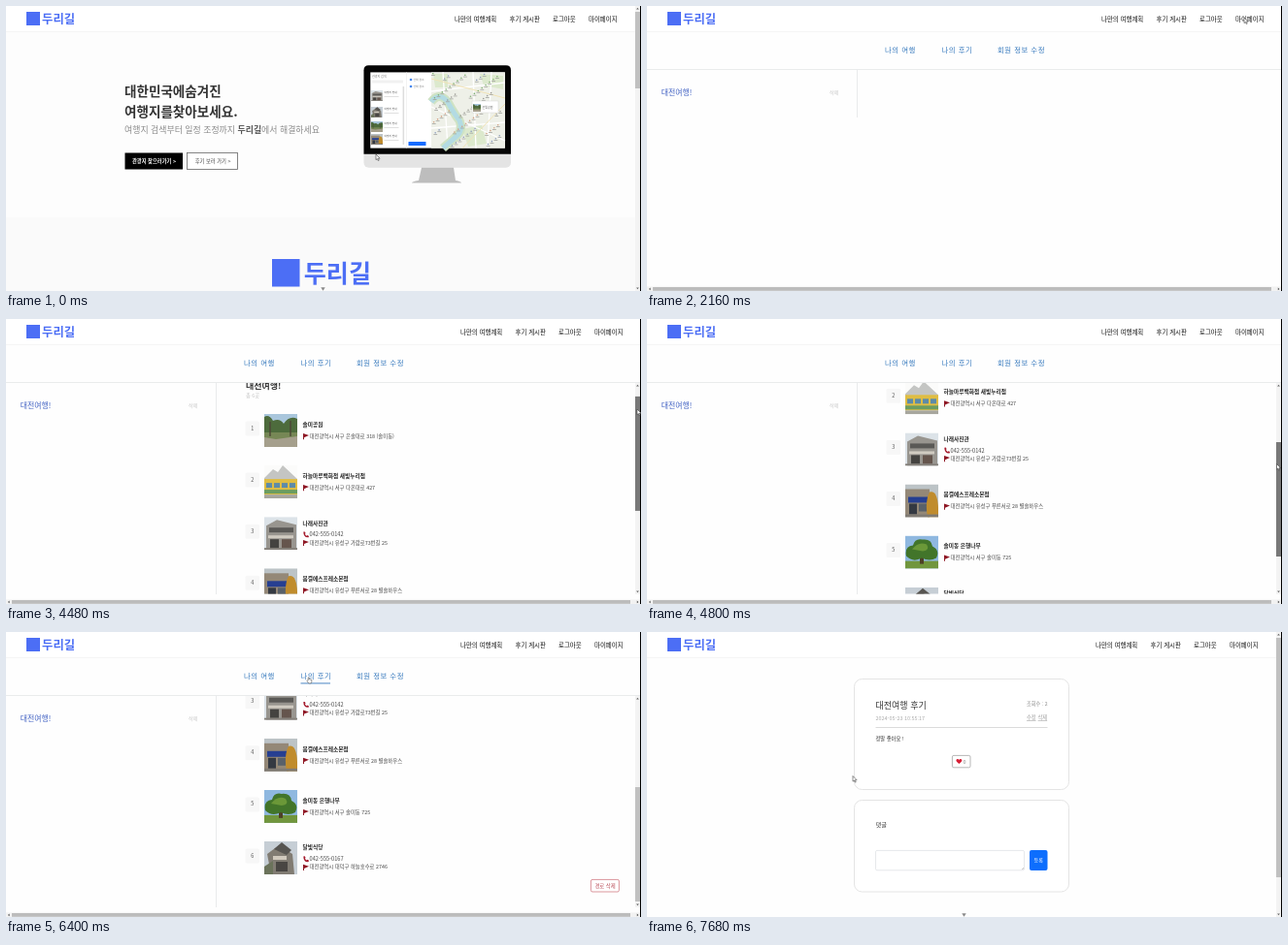
An HTML page for the animation above (8000 ms loop, 654 by 294 pixels).

```html
<!DOCTYPE html>
<html lang="ko">
<head>
<meta charset="utf-8">
<title>여행 계획</title>
<style>
html, body { margin: 0; width: 100%; height: 100%; overflow: hidden; background: #fff; }
svg { display: block; font-family: "Noto Sans CJK KR", "Noto Sans CJK", "Noto Sans", sans-serif; }
text { white-space: pre; }
</style>
</head>
<body>
<svg id="stage" width="654" height="294" viewBox="0 0 654 294"></svg>
<script>
const BLUE = '#4c6ef5', LINE = '#e4e6e8';

// y is the vertical middle of the text
const text = (x, y, s, size, fill = '#333', more = '') =>
  `<text x="${x}" y="${y + size * 0.37}" font-size="${size}" fill="${fill}" ${more}>${s}</text>`;
const rect = (x, y, w, h, fill, more = '') =>
  `<rect x="${x}" y="${y}" width="${w}" height="${h}" fill="${fill}" ${more}/>`;
const path = (d, fill, more = '') => `<path d="${d}" fill="${fill}" ${more}/>`;
const stroke = (d, color, width = 1) => path(d, 'none', `stroke="${color}" stroke-width="${width}"`);
const bold = 'font-weight="700"';

const logo = (x, y, size) =>
  rect(x, y, size, size, BLUE) +
  text(x + size * 1.15, y + size / 2, '두리길', size * 0.88, BLUE, bold);

// Flat pictures on a 34 x 34 field
const art = [
  rect(0, 0, 34, 34, '#a9c6dc') + rect(0, 20, 34, 14, '#a59f8c') +
    path('M0 3Q5 0 9 7Q16 4 20 10Q26 1 34 5V22H0Z', '#4d6b3c') +
    path('M0 19H34V23L12 26L0 24Z', '#768755') + stroke('M6 8V23M27 7V23', '#4c4536', 1.4),
  rect(0, 0, 34, 34, '#fbfbfa') + path('M0 13L9 4L14 7L19 0L34 14V20H0Z', '#c4c5c3') +
    rect(0, 14, 34, 16, '#dfbd43') + rect(0, 25, 34, 4, '#6c9d61') +
    [2, 10, 18, 26].map(x => rect(x, 18, 6, 5, '#5d8ba8')).join('') + rect(0, 30, 34, 4, '#a7a69d'),
  rect(0, 0, 34, 34, '#dce3e8') + path('M2 9L13 3L33 8V34H2Z', '#98958f') +
    rect(5, 11, 25, 5, '#5a5956') + rect(4, 19, 26, 3, '#d0cbc1') +
    rect(6, 23, 9, 9, '#444340') + rect(18, 23, 10, 9, '#65554d') + rect(0, 32, 34, 2, '#837f79'),
  rect(0, 0, 34, 34, '#bcc3c6') + rect(0, 5, 25, 29, '#948877') +
    rect(3, 13, 20, 6, '#263f91') + rect(4, 20, 8, 11, '#343942') + rect(14, 20, 8, 8, '#59616a') +
    path('M25 8Q35 5 34 34H23Q20 18 25 8Z', '#c08c2d') + rect(0, 31, 34, 3, '#807b74'),
  rect(0, 0, 34, 34, '#8fb8e0') + rect(0, 26, 34, 8, '#71963d') + rect(15, 19, 4, 10, '#4e4027') +
    path('M1 21Q-1 11 8 10Q10 2 18 4Q27 3 28 11Q36 15 32 23Q25 27 17 23Q8 28 1 21Z', '#42752a') +
    path('M7 14Q14 5 22 9Q26 15 18 16Z', '#6b9838'),
  rect(0, 0, 34, 34, '#c6ced5') + path('M3 13L15 4L29 13L31 34H7Z', '#817c73') +
    path('M10 8L18 1L28 9L23 14Z', '#575551') + rect(9, 15, 14, 4, '#d0c9bd') +
    rect(12, 21, 12, 10, '#494643') + path('M0 26L9 20V34H0Z', '#6b735b')
];
const photo = (i, x, y, w = 34, h = w) =>
  `<svg x="${x}" y="${y}" width="${w}" height="${h}" viewBox="0 0 34 34" preserveAspectRatio="none">${art[i]}</svg>`;

const nav = [[462, '나만의 여행계획'], [518.5, '후기 게시판'], [563, '로그아웃'], [600, '마이페이지']];
const header = dx => rect(0, 26, 654, 1, '#f5f5f5') + rect(0, 0, 654, 26, '#fff') +
  logo(21, 6, 14) + nav.map(([x, s]) => text(x + dx, 13.3, s, 6.45, '#111')).join('');

const vBar = (top, bottom) => rect(648, top, 5, bottom - top, '#f3f3f3') +
  path(`M649.1 ${top + 3.5}h2.8l-1.4 -1.7zM649.1 ${bottom - 3.5}h2.8l-1.4 1.7z`, '#666');
const pageBar = height => vBar(0, 294) + rect(648, 6, 5, height, '#c1c1c1');
const downMark = path('M324.3 290.3h4.4l-2.2 3.4z', '#8a8a8a');

function monitor() {
  // Small place marks and labels, spread evenly by a low-discrepancy rule
  const places = Array.from({ length: 70 }, (_, i) => {
    const x = 439 + (i * 0.618 % 1) * 70, y = 69 + (i * 0.7549 % 1) * 75;
    const color = ['#7eaf72', '#8d9cbd', '#d3a084', '#9a9a94'][i % 4];
    return rect(x, y, 1.6, 1.6, color, 'rx=".8"') + rect(x - 1, y + 2.2, 3.8, .8, '#a3a49f');
  }).join('');
  const map = rect(438, 68.4, 76, 78.2, '#eef0e8') +
    path('M440 70h15v14h-13zM488 70l24 2v14l-20 -4zM470 127l20 -4l5 19l-19 3z', '#dce9cd') +
    stroke('M438 88L514 79M438 126L514 120M450 68.4L455 146.6M481 68.4L484 146.6M500 68.4L496 146.6M438 104L514 139', '#fff', 1.3) +
    stroke('M438 99Q446 88 455 99Q462 112 467 118Q472 129 461 137L450 146.6', '#cfe3c4', 9) +
    stroke('M438 99Q446 88 455 99Q462 112 467 118Q472 129 461 137L450 146.6', '#b3dbe3', 5) +
    stroke('M438 75L514 95M470 146.6L514 101', '#f1e3b6', 1) + places +
    rect(480, 98, 27, 12, '#fff', 'stroke="#ccc" stroke-width=".4"') + photo(0, 481, 101, 8) +
    text(490.5, 104.5, '은빛공원', 3, '#555');
  const list = [87, 104, 119, 132].map((y, i) => photo([2, 5, 0, 3][i], 376, y, 12, 11) +
    text(389.5, y + 2.5, '여행지 안내', 2.7, '#555') + rect(389.5, y + 6, 15, .6, '#ccc')).join('');
  return rect(368.5, 61.3, 151.5, 105.5, '#e4e4e4', 'rx="5"') +
    path('M368.5 152.8V66.3Q368.5 61.3 373.5 61.3H515Q520 61.3 520 66.3V152.8Z', '#050505') +
    rect(375.3, 68.4, 138.4, 78.2, '#fff') + list + text(377, 73, '관광지 검색', 3, '#777') +
    rect(377, 76.5, 32, 3, '#f1f1f1') + rect(408.6, 83, 1.5, 60, '#ddd') +
    stroke('M412.5 68.4V146.6', '#eee', .7) +
    [76, 83].map(y => `<circle cx="417" cy="${y}" r="1.3" fill="#4687ed"/>` + text(419.5, y, '선택 장소', 2.8, '#777')).join('') +
    rect(414.5, 140, 18, 4, '#176cff', 'rx=".5"') + map +
    path('M428 166.8H461L463 180Q469 181 469 182.5H418Q418 181 425 180Z', '#bdbdbd');
}

const home = rect(0, 26, 648, 192, '#fdfdfd') + rect(0, 218, 648, 76, '#fafafa') +
  text(122, 88, '대한민국에숨겨진', 13.55, '#333', bold) +
  text(122, 109.2, '여행지를찾아보세요.', 13.55, '#333', bold) +
  text(122, 127.5, `여행지 검색부터 일정 조정까지 <tspan ${bold} fill="#555">두리길</tspan>에서 해결하세요`, 8.91, '#8b8b8b') +
  rect(122.5, 151.5, 59.5, 17, '#000') + text(130, 159.7, '관광지 찾으러가기 &gt;', 5.3, '#fff', bold) +
  rect(186.5, 151.5, 52, 17, '#fff', 'stroke="#666" stroke-width=".8"') +
  text(194.7, 159.7, '후기 보러 가기 &gt;', 5.3, '#444') +
  monitor() + logo(274, 261, 28.5) + downMark + header(0) + pageBar(79);

const tabs = [[245, '나의 여행'], [303.5, '나의 후기'], [361, '회원 정보 수정']]
  .map(([x, s]) => text(x, 45.5, s, 7.4, '#3578bd', 'letter-spacing=".5"')).join('');
const myPage = rect(0, 26, 654, 268, '#fefefe') + tabs + rect(0, 65, 654, .8, LINE) + header(6);

const trips = text(14.7, 89, '대전여행!', 7.9, '#4464c4') + text(188, 89.3, '삭제', 5, '#c5c5c5') +
  rect(0, 289.5, 654, 4.5, '#f2f2f2') + rect(6, 290, 637, 3.8, '#bcbcbc') +
  path('M3.6 290.6v2.6l-1.7 -1.3zM649.8 290.6v2.6l1.7 -1.3z', '#555');

const stops = [
  ['솔미공원', '대전광역시 서구 은솔대로 318 (솔미동)'],
  ['하늘마루백화점 새빛누리점', '대전광역시 서구 다온대로 427'],
  ['나래사진관', '대전광역시 유성구 가람로73번길 25', '042-555-0142'],
  ['봄결에스프레소본점', '대전광역시 유성구 푸른서로 28 별솔하우스'],
  ['솔미동 은행나무', '대전광역시 서구 솔미동 725'],
  ['달빛식당', '대전광역시 대덕구 하늘호수로 2746', '042-555-0167']
];
const flag = y => path(`M306 ${y - 2.8}l6 2l-5 2.2v2h-1z`, '#8e1724');
const phone = y => path(`M306.3 ${y - 2.6}l1.5 -.2l.8 1.7l-.7 .7q.6 1.3 1.8 1.9l.8 -.7l1.5 .9l-.4 1.4q-5.2 .6 -5.3 -5.7z`, '#a51c2e');
const stop = ([name, address, tel], i) => {
  const y = 112.5 + i * 53.1, nameY = y + (tel ? 6.3 : 10.7), addressY = y + (tel ? 26.5 : 22.8);
  return rect(246.5, y + 7.5, 14.5, 15, '#f7f7f7', 'rx="1.5"') +
    text(253.7, y + 14.5, i + 1, 5.5, '#555', 'text-anchor="middle"') + photo(i, 266, y) +
    text(305.5, nameY, name, 5.7, '#222', bold) + flag(addressY) + text(312.6, addressY, address, 5.35, '#444') +
    (tel ? phone(y + 18) + text(312.6, y + 18.2, tel, 5.6, '#444') : '');
};
const route = rect(216, 66, .8, 218, LINE) +
  '<svg x="217" y="66" width="431" height="217.5" viewBox="217 66 431 217.5"><g id="scroll">' +
  text(247, 83.5, '대전여행!', 9, '#333', bold) + text(247, 94, '총 6곳', 5.3, '#c4c4c4') +
  stops.map(stop).join('') +
  rect(602.4, 417.4, 29, 12.6, '#fff', 'rx="1.6" stroke="#ca6871" stroke-width=".7"') +
  text(606.4, 423.7, '경로 삭제', 5.4, '#b94d58') + '</g></svg>' +
  vBar(66, 284) + rect(648, 72, 5, 118, '#c1c1c1', 'id="thumb"');

const reviews = rect(143, 122, 367, .7, '#bbb') + rect(143, 137, 367, .7, LINE) + rect(143, 160, 367, .7, LINE) +
  text(152, 130, '번호', 5.4, '#777') + text(205, 130, '제목', 5.4, '#777') + text(435, 130, '작성일', 5.4, '#777') +
  text(156, 149, '1', 5.6) + text(205, 149, '대전여행 후기', 5.8) + text(435, 149, '2024-05-23', 5.4, '#888');

const card = (y, h) => rect(213.5, y, 221, h, '#fff', 'rx="8" stroke="#dedede" stroke-width=".8"');
const detail = rect(0, 26, 648, 268, '#fefefe') + card(48.5, 114) + card(173.5, 94.5) +
  text(235.5, 75.7, '대전여행 후기', 9, '#333') + text(391, 74, '조회수 : 2', 5.2, '#888') +
  text(235.5, 88.5, '2024-05-23 10:55:17', 5.45, '#aaa') +
  text(391, 88.5, '수정', 5.2, '#999', 'text-decoration="underline"') +
  text(402.6, 88.5, '삭제', 5.2, '#999', 'text-decoration="underline"') +
  rect(235.5, 98, 177, .8, '#d2d2d2') + text(235.5, 110, '정말 좋아요 !', 5.3, '#333') +
  rect(314.4, 127.4, 18.6, 12.4, '#fff', 'rx="1.5" stroke="#999" stroke-width=".7"') +
  path('M321.4 136q-5 -3.6 -1.8 -5q1.2 -.3 1.8 .9q.6 -1.2 1.8 -.9q3.2 1.4 -1.8 5z', '#d81e35') +
  text(325.4, 133.6, '0', 5.4, '#888') + text(235.5, 199, '댓글', 6.2, '#333') +
  rect(235.5, 225.4, 153, 20.4, '#fff', 'rx="1.5" stroke="#dcdfe2" stroke-width=".7"') +
  stroke('M386 245l2 -2M387.2 245l.8 -.8', '#888', .4) +
  rect(394, 225, 18.5, 21, '#0d6efd', 'rx="2"') + text(398.6, 235.5, '등록', 5.1, '#fff') +
  downMark + header(0) + pageBar(247);

const group = (id, body) => `<g id="${id}">${body}</g>`;
stage.innerHTML = rect(0, 0, 654, 294, '#fff') +
  group('homeView', home) + group('myView', myPage) + group('tripView', trips) +
  group('shortEdge', rect(216, 66, .8, 49, LINE)) + group('routeView', route) +
  group('tabLine', rect(303.5, 52.5, 30.5, .9, '#3578bd')) +
  group('reviewView', reviews) + group('rowLine', rect(205, 152.2, 34, .5, '#333')) +
  group('detailView', detail) + rect(653, 0, 1, 294, '#000') +
  group('arrow', path('M0 0V5.7L1.3 4.5L2.3 6.6L3.2 6.2L2.3 4.2H4.1Z', '#fff', 'stroke="#333" stroke-width=".55"')) +
  group('hand', path('M1.2 3.4V.6Q1.7 -.2 2.2 .6V2.2L4.8 2.8V5L4.2 6.4H1.7L0 3.9Q.2 3.1 1.2 3.4Z', '#fff', 'stroke="#333" stroke-width=".5"'));

// Rows of time, value, value...; eased between neighbours
const pointer = [[0, 381, 153], [80, 381, 153], [1520, 401.5, 57], [1760, 615, 12], [2240, 615, 12],
  [3200, 79.5, 91.5], [3300, 79.5, 91.5], [3680, 649.5, 82], [4000, 650, 85], [4160, 650, 85],
  [4480, 650, 93], [4960, 648, 169], [5040, 644.5, 172], [5280, 641, 193], [5520, 641, 193],
  [6400, 310, 46.5], [6800, 310, 46.5], [7360, 212, 148.5], [8000, 212, 148.5]];
const scrolling = [[0, 0], [4160, 0], [4480, 14.5], [5040, 157], [5280, 162], [8000, 162]];

function at(keys, t) {
  const i = keys.findIndex(k => k[0] > t), a = keys[i - 1], b = keys[i];
  const u = (t - a[0]) / (b[0] - a[0]), e = u * u * (3 - 2 * u);
  return a.slice(1).map((v, j) => v + (b[j + 1] - v) * e);
}
const el = id => document.getElementById(id);
const show = (id, on) => el(id).setAttribute('display', on ? 'inline' : 'none');

function draw() {
  const t = performance.now() % 8000, during = (a, b) => t >= a && t < b;
  show('homeView', t < 1840);
  show('myView', during(1840, 7520));
  show('tripView', during(1840, 6560));
  show('shortEdge', during(1840, 3360));
  show('routeView', during(3360, 6560));
  show('tabLine', during(6320, 6880));
  show('reviewView', during(6560, 7520));
  show('rowLine', during(7300, 7520));
  show('detailView', t >= 7520);

  const [s] = at(scrolling, t), [x, y] = at(pointer, t);
  el('scroll').setAttribute('transform', `translate(0 ${-s})`);
  el('thumb').setAttribute('y', 72 + s * 88 / 162);
  el('thumb').setAttribute('fill', during(4160, 5360) ? '#787878' : during(4000, 4160) ? '#a8a8a8' : '#c1c1c1');

  const pointing = during(1740, 1840) || during(6320, 6880) || during(7300, 7520);
  show('arrow', !pointing);
  show('hand', pointing);
  for (const id of ['arrow', 'hand']) el(id).setAttribute('transform', `translate(${x} ${y})`);
  requestAnimationFrame(draw);
}
draw();
</script>
</body>
</html>
```
